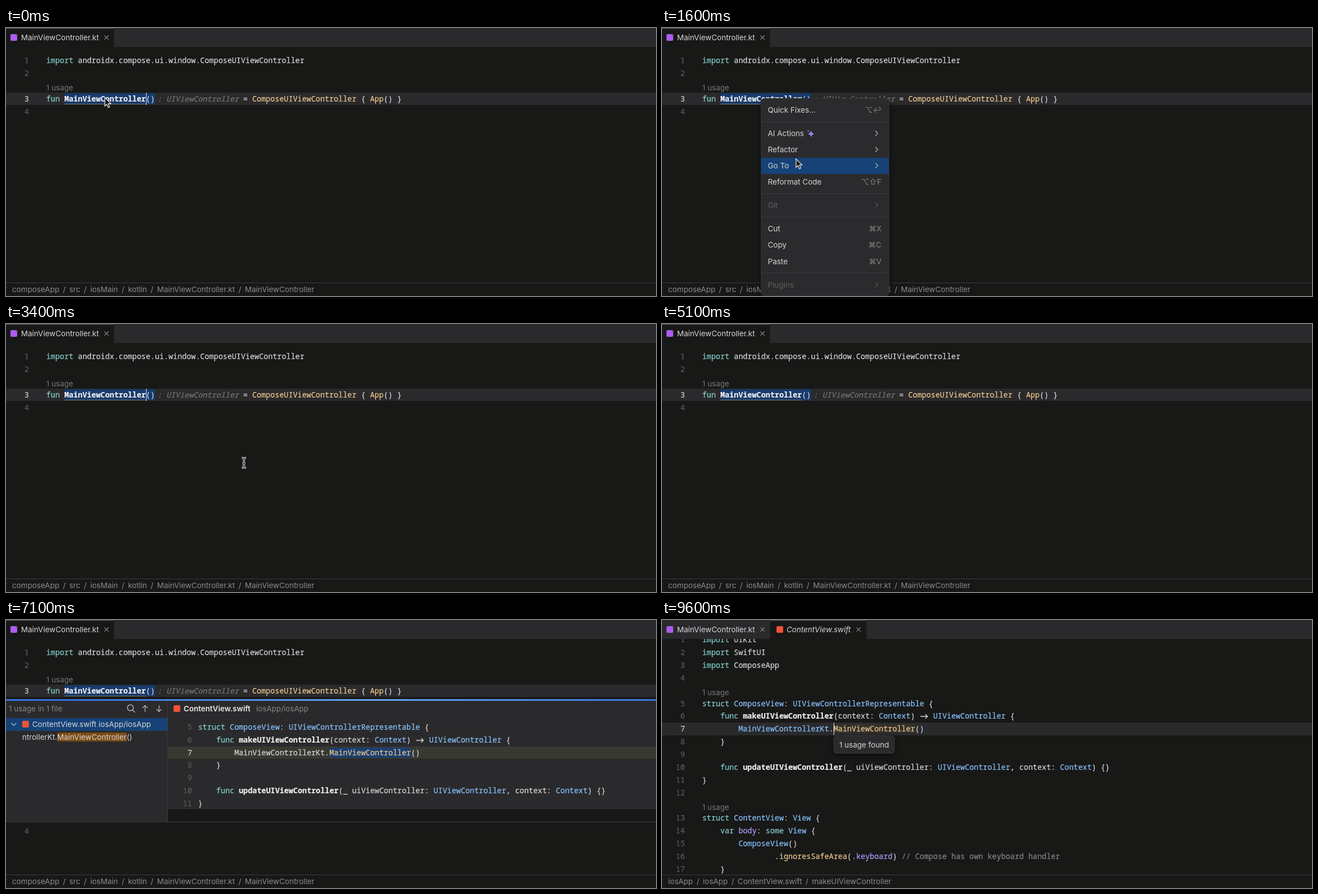
Animation of 1164 by 481 pixels, one loop 9900 ms. Source, as an HTML page:

```html
<!DOCTYPE html>
<html lang="en">
<head>
<meta charset="utf-8">
<title>Go to usages</title>
<style>
html, body { margin: 0; width: 100%; height: 100%; overflow: hidden; background: #181817; }
#stage { position: relative; width: 1164px; height: 481px; overflow: hidden; background: #181817;
  font: 13.53px/20px Inter, sans-serif; color: #d6d6d8; }
#stage div, #stage svg.i { position: absolute; white-space: pre; }
#stage [hidden] { display: none; }
.g { inset: 0; }
.i { overflow: visible; fill: none; stroke-width: 1.2; }
.c { font: 500 13.53px/23px "Noto Sans Mono", "DejaVu Sans Mono", monospace;
  font-variant-ligatures: none; -webkit-text-stroke: .2px; }
.b { font-weight: 600; }
.it { font-style: italic; }
.k { color: #82d2ce; }
.t { color: #87c3ff; }
.y, .hit { color: #ebc88d; }
.d { color: #ededed; font-weight: 700; }
.p { color: #af9cff; }
.l { color: #b4d3ea; }
.m { color: #858585; }
.h { color: #757575; font-style: italic; margin-left: 4px; }
.hit { background: #34302a; }
#preview .hit { background: #1b3f72; }
.found { background: #7b4c14; }
.box { box-sizing: border-box; background: #2b2b2d; border: 1px solid #343436; border-radius: 6px;
  box-shadow: 0 3px 8px #0008; }
#hover { left: 177px; width: 229px; height: 29px; background: #164277; }
#bar { left: 0; top: 142px; width: 1164px; height: 2.5px;
  background: repeat-x 0 0 / 1164px 3px linear-gradient(90deg, #3270e0, #6ba2f5, #3270e0); }
.arrow { vertical-align: -1px; fill: none; stroke: #d6d6d8; stroke-width: 1.4; }
.crumb { margin: 0 6.5px; }
</style>
</head>
<body>
<div id="stage"></div>
<script>
const LOOP = 9900, STEP = 100, PITCH = 22.88;
const TEXT = '#d6d6d8', DIM = '#858585', FAINT = '#5b5b5c', PANEL = '#2a2a2c', EDGE = '#3a3a3c', BLUE = '#164277';
const $ = id => document.getElementById(id);

const group = (id, ...parts) => `<div class="g" id="${id}" hidden>${parts.join('')}</div>`;
const rect = (x, y, w, h, color, extra = '') =>
  `<div style="left:${x}px;top:${y}px;width:${w}px;height:${h}px;background:${color};${extra}"></div>`;
const box = (x, y, w, h) => `<div class="box" style="left:${x}px;top:${y}px;width:${w}px;height:${h}px"></div>`;
const label = (x, y, s, color = TEXT, cls = '') =>
  `<div class="${cls}" style="left:${x}px;top:${y - 10}px;color:${color}">${s}</div>`;
const labelRight = (x, y, s, color = DIM) =>
  `<div style="right:${1164 - x}px;top:${y - 10}px;color:${color}">${s}</div>`;
const icon = (x, y, d, color = TEXT, extra = '') =>
  `<svg class="i" style="left:${x}px;top:${y}px;${extra}" width="1" height="1" stroke="${color}"><path d="${d}"/></svg>`;
const badge = (x, y, color) => rect(x - 6, y - 6, 12, 12, color, 'border-radius:2px');
const close = x => icon(x, 17, 'M-3.7-3.7L3.7 3.7M3.7-3.7L-3.7 3.7', '#8f8f91');
const chevron = (y, color = '#b0b0b2') => icon(384, y, 'M-2-4.5L2.5 0L-2 4.5', color);

// Code lines: tokens alternate between class and text.
const rowY = n => 58.2 + (n - 1) * PITCH;
const arrow = '<svg class="arrow" width="16.24" height="10"><path d="M1.5 5H14.5M10.5 1.2L14.5 5L10.5 8.8"/></svg>';
function code(x, y, tokens) {
  let html = '';
  for (let i = 0; i < tokens.length; i += 2)
    html += `<span class="${tokens[i]}">${tokens[i + 1].replace('->', arrow)}</span>`;
  return `<div class="c" style="left:${x}px;top:${y - 11.2}px">${html}</div>`;
}
const num = (right, y, n, color = FAINT) =>
  `<div class="c" style="right:${1164 - right}px;top:${y - 11.2}px;color:${color}">${n}</div>`;
const line = (x, right, y, n, tokens, active) =>
  num(right, y, n, active ? '#cfcfcf' : FAINT) + code(x, y, tokens);

const swift = full => [
  ['k', 'import ', '', 'UIKit'],
  ['k', 'import ', '', 'SwiftUI'],
  ['k', 'import ', '', 'ComposeApp'],
  [],
  ['k', 'struct ', 't', 'ComposeView', '', ': ', 't', 'UIViewControllerRepresentable', '', ' {'],
  ['k', '    func ', 'd', 'makeUIViewController', '', '(context: ', 't', 'Context', '', ') -> ', 't', 'UIViewController', '', ' {'],
  [full ? 't' : '', '        MainViewControllerKt', '', '.', 'hit', 'MainViewController', '', '()'],
  ['', '    }'],
  [],
  ['k', '    func ', 'd', 'updateUIViewController', '', '(_ uiViewController: ', 't', 'UIViewController', '', ', context: ', 't', 'Context', '', ') {}'],
  ['', '}'],
  [],
  ['k', 'struct ', 't', 'ContentView', '', ': ', 't', 'View', '', ' {'],
  ['k', '    var ', 'p', 'body', '', ': ', 'k', 'some ', 't', 'View', '', ' {'],
  [full ? 't' : 'y', '        ComposeView', '', '()'],
  ['', '                .', 'y', 'ignoresSafeArea', '', '(.', full ? 'p' : 'l', 'keyboard', '', ') ', 'm', '// Compose has own keyboard handler'],
  ['', '    }'],
  ['', '}']
];

const lens = n => label(72, rowY(n) + 2.8, '1 usage', '#777');
function swiftFile(id, lenses, full) {
  const place = n => rowY(!lenses ? n : n < 5 ? n - 1 : n < 13 ? n : n + 1);
  return group(id, ...swift(full).map((tokens, i) => line(72, 41, place(i + 1), i + 1, tokens, i === 6)),
    lenses ? lens(4) + lens(13) : '');
}

const tabs = (x, w) => rect(0, 0, 1164, 34, PANEL) + rect(x, 0, w, 35, '#181817') +
  rect(x, 0, w, 1, '#666668') + rect(193, 0, 1, 34, '#202021') + badge(14, 16.5, '#a95cf0') +
  label(27, 17, 'MainViewController.kt') + close(179.5);
const footer = (...names) => rect(0, 457, 1164, 24, '#181817') + rect(0, 457, 1164, 1, EDGE) +
  label(11, 469, names.join('<span class="crumb">/</span>'), '#8b8b8d');

const main = group('main',
  rect(0, 115.5, 1164, 22.5, PANEL),
  line(72, 41, rowY(1), 1, ['k', 'import ', '', 'androidx.compose.ui.window.ComposeUIViewController']),
  num(41, rowY(2), 2), lens(3),
  rect(104.5, 117, 162, 19.5, '#173b6c'),
  rect(104.5, 135.5, 146, 1.5, '#80705a'),
  line(72, 41, rowY(4), 3, ['k', 'fun ', 'd', 'MainViewController', '', '()', 'h', ': UIViewController',
    '', ' = ', 'y', 'ComposeUIViewController', '', ' { ', 'y', 'App', '', '() }'], true),
  '<div class="g" id="last">', num(41, rowY(5), 4), '</div>',
  tabs(0, 193),
  footer('composeApp', 'src', 'iosMain', 'kotlin', 'MainViewController.kt', 'MainViewController'));

const panel = group('panel',
  rect(0, 138, 1164, 5, '#181817'), rect(0, 143, 1164, 220, PANEL),
  rect(289, 145, 1, 218, EDGE), rect(0, 362, 1164, 1, '#3e3e40'),
  '<div id="bar"></div>',
  icon(222.5, 158, 'M5-.5A5.3 5.3 0 1 1-5.6-.5A5.3 5.3 0 1 1 5-.5M3.6 3.6L8 7.8', '#cfcfd1'));
const stepper = color => icon(248.5, 159, 'M0 6V-5.5M-4.5-1L0-5.5L4.5-1', color) +
  icon(273.5, 159, 'M0-6V5.5M-4.5 1L0 5.5L4.5 1', color);
const search = group('search', label(5, 159, '0 of 1 usages', DIM), stepper('#6d6d6f'),
  label(745.5, 253, 'Select usage to preview', '#7d7d7f'));
const preview = group('preview',
  label(5, 159, '1 usage in 1 file', DIM), stepper('#c0c0c2'),
  rect(0, 176, 289, 23, BLUE), icon(13.5, 187, 'M-4.5-2L0 2.5L4.5-2', '#c0c0c2'),
  badge(34.5, 187, '#f05138'), label(47, 187, 'ContentView.swift iosApp/iosApp'),
  label(29, 210, 'ntrollerKt.<span class="found">MainViewController</span>()'),
  badge(306, 159, '#f05138'), label(318, 159, 'ContentView.swift', '#e8e8ea', 'b'),
  label(448, 159, 'iosApp/iosApp', DIM),
  rect(290, 226.5, 874, 22.5, '#383930'),
  ...swift(false).slice(4, 11).map((tokens, i) => line(344, 333, 192 + i * PITCH, i + 5, tokens, i === 2)),
  rect(290, 339, 874, 23, '#181817'), rect(290, 338, 874, 1, EDGE));

const MENU = [
  [147, 'Quick Fixes…', '⌥↩'], [189, 'AI Actions'], [218, 'Refactor'], [247, 'Go To'],
  [276, 'Reformat Code', '⌥⇧F'], [318, 'Git'], [360, 'Cut', '⌘X'], [389, 'Copy', '⌘C'],
  [418.5, 'Paste', '⌘V'], [461, 'Plugins']
];
const off = name => name === 'Git' || name === 'Plugins';
const sparkle = 'M0-6Q1-1 6 0Q1 1 0 6Q-1 1-6 0Q-1-1 0-6M-5-7Q-4.6-5.4-3-5Q-4.6-4.6-5-3Q-5.4-4.6-7-5Q-5.4-5.4-5-7';
const menu = group('menu', box(177, 126, 229.5, 355), '<div id="hover"></div>',
  ...[168, 297, 339, 439.5].map(y => rect(178, y - .5, 227, 1, EDGE)),
  ...MENU.map(([y, name, keys]) => label(189.5, y, name, off(name) ? '#5f5f61' : TEXT) +
    (keys ? labelRight(393, y, keys) : chevron(y, off(name) ? '#555557' : undefined))),
  icon(267, 190, sparkle, 'none', 'fill:#9b84f5'));

const GOTO = [
  [247, 'Usages', '⌘U'], [276, 'Definition', '⌘B'], [305, 'Type Definition', '⇧⌘B'],
  [334, 'Implementations', '⌥⌘B'], [376, 'Next Problem', 'F2'], [405, 'Previous Problem', '⇧F2']
];
const submenu = group('submenu', box(405, 227, 267, 198), rect(406, 232.5, 265, 29, BLUE),
  rect(406, 354.5, 265, 1, EDGE),
  ...GOTO.map(([y, name, keys]) => label(418, y, name) + labelRight(659, y, keys)));

const swiftView = group('swift', rect(0, 184, 1164, 22.5, PANEL),
  swiftFile('plain', false, false), swiftFile('lensed', true, false), swiftFile('full', true, true),
  tabs(193, 173), badge(210.5, 16.5, '#f05138'), label(223, 17, 'ContentView.swift', TEXT, 'it'), close(351.5),
  footer('iosApp', 'iosApp', 'ContentView.swift', 'makeUIViewController'),
  '<div class="g" id="tip">', box(307, 207, 110, 33), label(317.5, 223.5, '1 usage found'), '</div>');

const pointer = group('pointer',
  icon(0, 0, 'M0 0V15.2L3.5 11.9L6 17.8L8.6 16.7L6.1 10.9H10.8Z', '#f2f2f2', 'fill:#151515'));
const beamPath = 'M-4-9Q0-9 0-6Q0-9 4-9M0-6V6M-4 9Q0 9 0 6Q0 9 4 9M-2.5 1H2.5';
const beam = group('beam', icon(0, 0, beamPath, '#f2f2f2', 'stroke-width:3.2'), icon(0, 0, beamPath, '#151515'));

$('stage').innerHTML = main + swiftView + panel + search + preview +
  group('caret', rect(0, 0, 1.3, 22, '#f0f0f0')) + menu + submenu + pointer + beam;

const SPANS = {
  main: [0, 7300], menu: [600, 3300], submenu: [1800, 3300], pointer: [0, 3300], beam: [3300, 4100],
  panel: [5700, 7300], search: [5700, 6300], preview: [6300, 7300],
  swift: [7300, LOOP], plain: [7300, 8500], lensed: [8500, 9100], full: [9100, LOOP], tip: [8000, LOOP]
};
// time, x, y
const PATH = [
  [0, 177, 125], [800, 177, 125], [1600, 240, 235], [2200, 240, 235], [2700, 426, 243],
  [3300, 426, 249], [3500, 426, 249], [4100, 436, 500]
];
function pointerAt(t) {
  const i = PATH.findIndex(p => p[0] > t);
  if (i < 0) return PATH[PATH.length - 1].slice(1);
  const [a, b] = [PATH[i - 1], PATH[i]];
  const u = (t - a[0]) / (b[0] - a[0]), e = u * u * (3 - 2 * u);
  return [1, 2].map(k => a[k] + (b[k] - a[k]) * e);
}
function caretOn(t) {
  if (t < 600 || t >= 9600) return true;
  return t >= 3300 && t < 5700 && (t < 4300 || Math.floor((t - 4300) / 200) % 2 === 1);
}
const move = (id, x, y) => { $(id).style.transform = `translate(${x}px,${y}px)`; };

function draw(t) {
  for (const id in SPANS) $(id).hidden = t < SPANS[id][0] || t >= SPANS[id][1];
  const [x, y] = pointerAt(t);
  move('pointer', x, y);
  move('beam', x, y);
  const over = MENU.find(([c, name]) => Math.abs(y - c) < 14.6 && !off(name));
  $('hover').hidden = !over;
  if (over) $('hover').style.top = over[0] - 14.5 + 'px';
  $('caret').hidden = !caretOn(t);
  if (t < 7300) move('caret', 250.7, 116); else move('caret', 307.4, 184.5);
  move('last', 0, t >= 5700 ? 228.5 : 0);
  $('bar').style.backgroundPositionX = 218 + (t - 5700) / 1600 * 1164 + 'px';
  $('tip').style.opacity = Math.min(1, (t - 7900) / 300);
}

function frame(now) {
  draw(Math.floor(now % LOOP / STEP) * STEP);
  requestAnimationFrame(frame);
}
draw(0);
requestAnimationFrame(frame);
</script>
</body>
</html>
```
